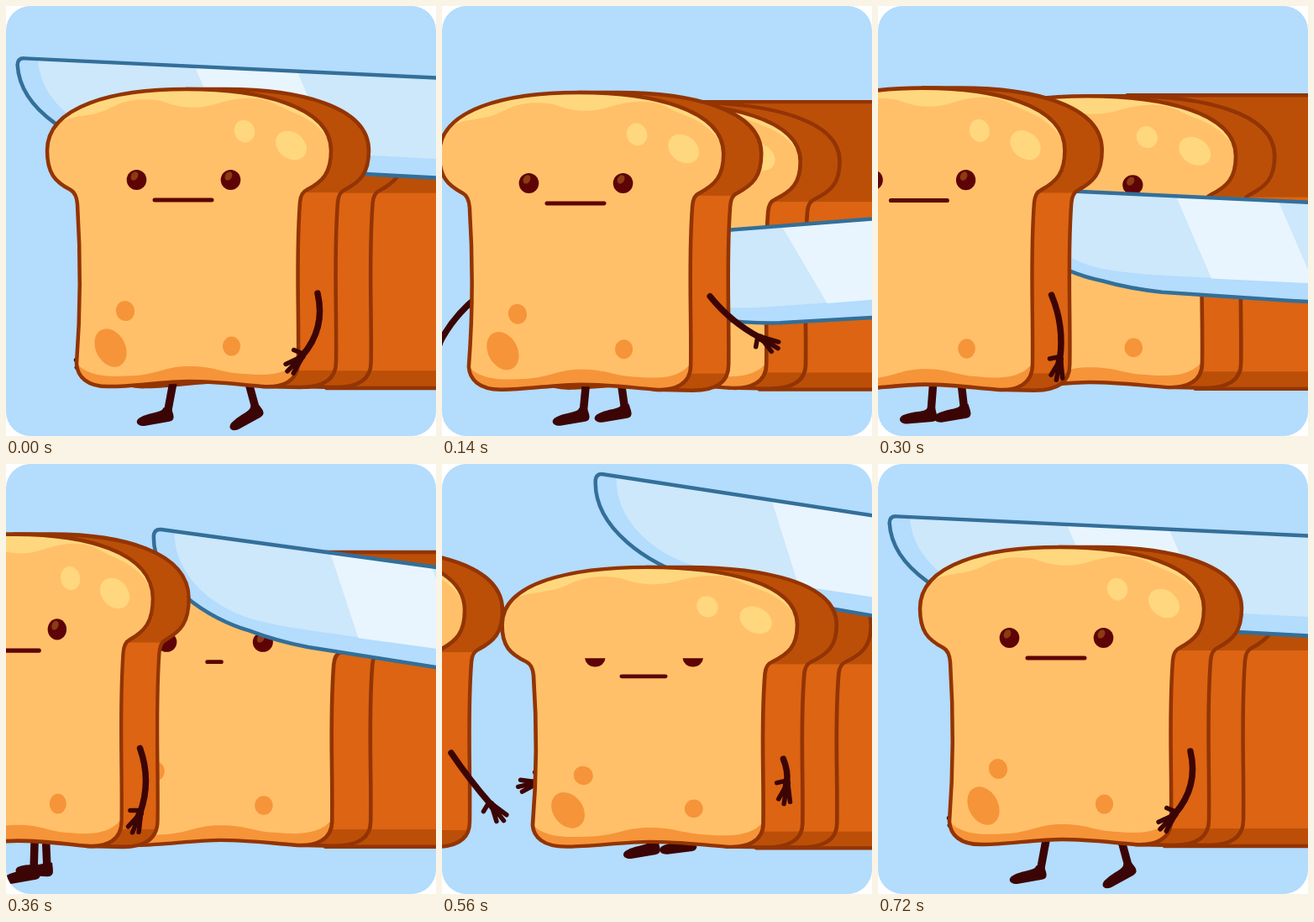
Write an HTML page with a canvas that moves like this. It is 512 px wide and 512 px high and loops after 740 ms.

```html
<!DOCTYPE html>
<html lang="en">
<head>
<meta charset="utf-8">
<title>Toast line</title>
<style>
html, body { margin: 0; width: 100%; height: 100%; overflow: hidden; background: #fff; }
canvas { display: block; width: 512px; height: 512px; }
</style>
</head>
<body>
<canvas id="stage"></canvas>
<script>
const LOOP = 740, STEP = 20;
const C = {
  sky: '#b3dcfd', line: '#933403', face: '#ffc069', glow: '#ffd77e', spot: '#f69439',
  dark: '#bb4f08', side: '#dc6413', limb: '#3c0505', eye: '#5e0407', shine: '#8c3b12',
  blade: '#cde7fb', gleam: '#e8f5ff', steel: '#336f99'
};

const canvas = document.getElementById('stage');
const ctx = canvas.getContext('2d');
const dpr = window.devicePixelRatio || 1;
canvas.width = canvas.height = 512 * dpr;

// Shapes
const path = d => new Path2D(d);
const face = path('M215 99C300 99 387 118 387 172C387 199 377 209 358 219Q351 222 350 234' +
  'C345 300 349 360 348 424C348 446 330 455 305 453C270 450 250 447 218 447C190 447 150 453 125 453' +
  'C95 454 85 440 84 426C89 360 89 300 85 236Q84 223 77 219C58 209 49 199 49 172C49 118 130 99 215 99Z');
const crust = path('M215 99H261C346 99 432 118 432 172C432 199 422 209 403 219Q396 222 395 234' +
  'C390 300 394 360 393 424C393 446 375 454 350 454L305 453Z');
const loaf = path('M261 98H900V455H340Z');
const topGlow = path('M40 158Q55 140 75 134C95 129 105 131 125 121C145 110 165 110 185 113' +
  'C210 123 232 123 255 115C285 107 305 108 325 119C345 129 365 132 382 157L400 90H40Z');
const baseGlow = path('M80 420C95 445 130 441 155 440C185 437 190 429 218 429C250 429 255 437 285 438' +
  'C315 441 345 438 352 412V470H80Z');
const blade = path('M0 8Q0 0 8 0H800V121L354 118L200 115C165 113 145 109 128 105C80 98 6 66 0 8Z');
const flat = path('M24 0C28 45 72 82 130 91Q160 95 200 95L800 98V0Z');
const gleam = path('M211 0H333L380 96H258Z');
const foot = path('M-4 -8C-6 -2 -18 -4 -31 1C-40 4 -38 12 -28 12L2 9Q9 8 7 0L5 -8Z');
const fingers = path('M4 -2L22 -6M4 0L25 1M4 1L20 8M-3 0L1 12');

// Key poses: [time, value, ...]
const WAIT_X = [[0, 252], [190, 242], [440, 250], [560, 240], [720, 212], [740, 211]];
const WALK_X = [[0, 211], [140, 159], [240, 91], [360, 7], [440, -46], [560, -149], [740, -290]];
const STRIDE = [[0, 53], [140, 25], [240, 32], [360, 8], [440, 36]];
const KNIFE = [
  [0, 14, 62, 2.7], [140, 194, 278, -4.4], [240, 111, 311, -1.7], [360, 177, 77, 7.8],
  [440, 109, -19, 11.9], [500, 150, -45, 11], [560, 184, 11, 8.7], [720, 14, 62, 2.7]
];

// Timing
const bump = (t, mid, width) => Math.exp(-(((t - mid) / width) ** 2));
const rad = deg => deg * Math.PI / 180;

function ease(t, from, to) {
  const s = Math.min(1, Math.max(0, (t - from) / (to - from)));
  return s * s * (3 - 2 * s);
}

// Monotone cubic through key poses
function at(keys, t) {
  const last = keys.length - 1;
  if (t >= keys[last][0]) return keys[last].slice(1);
  const i = keys.findIndex((k, n) => keys[n + 1][0] > t);
  const h = keys[i + 1][0] - keys[i][0], s = (t - keys[i][0]) / h;
  const rate = (k, c) => (keys[k + 1][c] - keys[k][c]) / (keys[k + 1][0] - keys[k][0]);
  const slope = (k, c) => {
    if (k === 0 || k === last) return 0;
    const a = rate(k - 1, c), b = rate(k, c);
    return a * b <= 0 ? 0 : 2 * a * b / (a + b);
  };
  return keys[i].slice(1).map((p, n) => {
    const d = keys[i + 1][n + 1] - p;
    const m0 = slope(i, n + 1) * h, m1 = slope(i + 1, n + 1) * h;
    return p + s * (m0 + s * (3 * d - 2 * m0 - m1 + s * (m0 + m1 - 2 * d)));
  });
}

// Squashed by the cut, then gathering before the first step
function waitPose(t) {
  const squash = .05 * bump(t, 190, 110) + .018 * bump(t, 400, 70) + .06 * bump(t, 560, 60);
  return {
    x: at(WAIT_X, t)[0], y: 455 + 40 * squash,
    sx: 1 + Math.min(1.3 * squash, .04), sy: 1 - squash
  };
}

function walkPose(t) {
  const sy = 1 + .05 * bump(t, 370, 75) - .018 * bump(t, 240, 60);
  return { x: at(WALK_X, t)[0], y: 455 + 5.5 * bump(t, 215, 100) + t / 280, sx: 1 / sy, sy };
}

// Drawing helpers
function group(draw) { ctx.save(); draw(); ctx.restore(); }

function fill(shape, color) { ctx.fillStyle = color; ctx.fill(shape); }

function stroke(shape, color, width) {
  ctx.strokeStyle = color;
  ctx.lineWidth = width;
  ctx.stroke(shape);
}

function oval(x, y, rx, ry, deg, color) {
  ctx.beginPath();
  ctx.ellipse(x, y, rx, ry, rad(deg), 0, 7);
  ctx.fillStyle = color;
  ctx.fill();
}

function place(x, y, deg) {
  ctx.translate(x, y);
  ctx.rotate(rad(deg));
}

function enter(p) {
  ctx.translate(p.x, p.y);
  ctx.scale(p.sx, p.sy);
  ctx.translate(-211, -455);
}

function drawSide(shape) {
  fill(shape, C.dark);
  group(() => {
    ctx.clip(shape);
    ctx.fillStyle = C.side;
    ctx.fillRect(0, 222, 900, 212);
  });
  stroke(shape, C.line, 4.5);
}

function drawEye(x, y, lid) {
  group(() => {
    ctx.beginPath();
    ctx.rect(x - 14, y - 13 + 26 * lid, 28, 28);
    ctx.clip();
    oval(x, y, 11.8, 12, 0, C.eye);
    oval(x - 2.5, y - 4.5, 4, 5.5, 30, C.shine);
  });
}

function drawFace(mouth, blink) {
  const drop = 6.3 * blink;
  fill(face, C.face);
  group(() => {
    ctx.clip(face);
    fill(topGlow, C.glow);
    fill(baseGlow, C.spot);
  });
  oval(284, 149, 12, 13.5, -20, C.glow);
  oval(339.5, 166, 20, 15.5, 38, C.glow);
  oval(142, 363, 11, 12, -15, C.spot);
  oval(124.5, 407, 17.5, 24, -28, C.spot);
  oval(268.5, 405, 10.5, 11.5, 0, C.spot);
  stroke(face, C.line, 4.5);
  drawEye(155.5, 207 + drop, .54 * blink);
  drawEye(267.5, 207 + drop, .54 * blink);
  stroke(path(`M${211 - mouth} ${231 + drop}H${211 + mouth}`), C.eye, 5);
}

function drawArm(x, y, length, angle, bend, turn) {
  group(() => {
    place(x, y, angle);
    stroke(path(`M0 0Q${length * .5} ${-bend} ${length} 0`), C.limb, 7.5);
    place(length, 0, turn);
    stroke(path('M0 0L8 0'), C.limb, 9);
    stroke(fingers, C.limb, 5.5);
  });
}

function drawLeg(hip, top, ankle, y, tilt) {
  stroke(path(`M${hip} ${top}L${ankle} ${y}`), C.limb, 9.5);
  group(() => {
    place(ankle, y, tilt);
    fill(foot, C.limb);
  });
}

function drawLegs(p, half, y, lift) {
  const mid = p.x + 34, top = Math.min(p.y - 12, y - 4);
  drawLeg(mid - .85 * half, top, mid - half, y, 30 * lift - 4);
  drawLeg(mid + .8 * half, top, mid + half, y - 4, 14 - .7 * half - 20 * lift);
}

function drawSlice(t, walking) {
  const p = walking ? walkPose(t) : waitPose(t);
  const grow = walking ? 1 : ease(t, 460, 700);
  const swing = walking
    ? 66 + (38 - t * .038) * Math.cos(2 * Math.PI * t / 350)
    : 68 + 36 * grow;
  const half = walking ? at(STRIDE, t)[0] : 3 + 50 * grow;
  const X = x => p.x + p.sx * (x - 211), Y = y => p.y + p.sy * (y - 455);
  const length = 77 * grow;

  if (grow) {
    drawLegs(p, half, 438 + 48 * grow, walking ? bump(t, 240, 45) : 0);
    const back = 83 + .72 * (104 - swing);
    drawArm(X(95), Y(342), length * .95, back, -8 * grow, 139 + 40 * (1 - grow) - back);
  }
  group(() => {
    enter(p);
    drawSide(crust);
    if (walking) drawFace(34, 0);
    else drawFace(8 + 26 * ease(t, 440, 640), bump(t, 560, 60));
  });
  if (grow) drawArm(X(371), Y(342), length, swing, .43 * (swing - 58) * grow, .6 * (swing - 58));
}

function drawLoaf(t, nextShown) {
  const p = waitPose(t);
  group(() => {
    enter(p);
    drawSide(loaf);
  });
  if (nextShown) group(() => {
    enter({ ...p, x: p.x + 41 });
    drawSide(crust);
  });
}

function drawKnife(t) {
  group(() => {
    place(...at(KNIFE, t));
    fill(blade, C.sky);
    group(() => {
      ctx.clip(blade);
      fill(flat, C.blade);
      fill(gleam, C.gleam);
    });
    stroke(blade, C.steel, 4.5);
  });
}

function render(t) {
  const raised = t >= 500;
  ctx.setTransform(dpr, 0, 0, dpr, 0, 0);
  ctx.clearRect(0, 0, 512, 512);
  ctx.lineCap = ctx.lineJoin = 'round';
  group(() => {
    ctx.beginPath();
    ctx.roundRect(0, 0, 512, 512, 29);
    ctx.clip();
    ctx.fillStyle = C.sky;
    ctx.fillRect(0, 0, 512, 512);
    drawLoaf(t, raised);
    if (raised) drawKnife(t);
    drawSlice(t, false);
    if (!raised) drawKnife(t);
    drawSlice(t, true);
  });
}

const start = performance.now();
function tick() {
  const t = (performance.now() - start) % LOOP;
  render(Math.floor(t / STEP) * STEP);
  requestAnimationFrame(tick);
}
tick();
</script>
</body>
</html>
```
